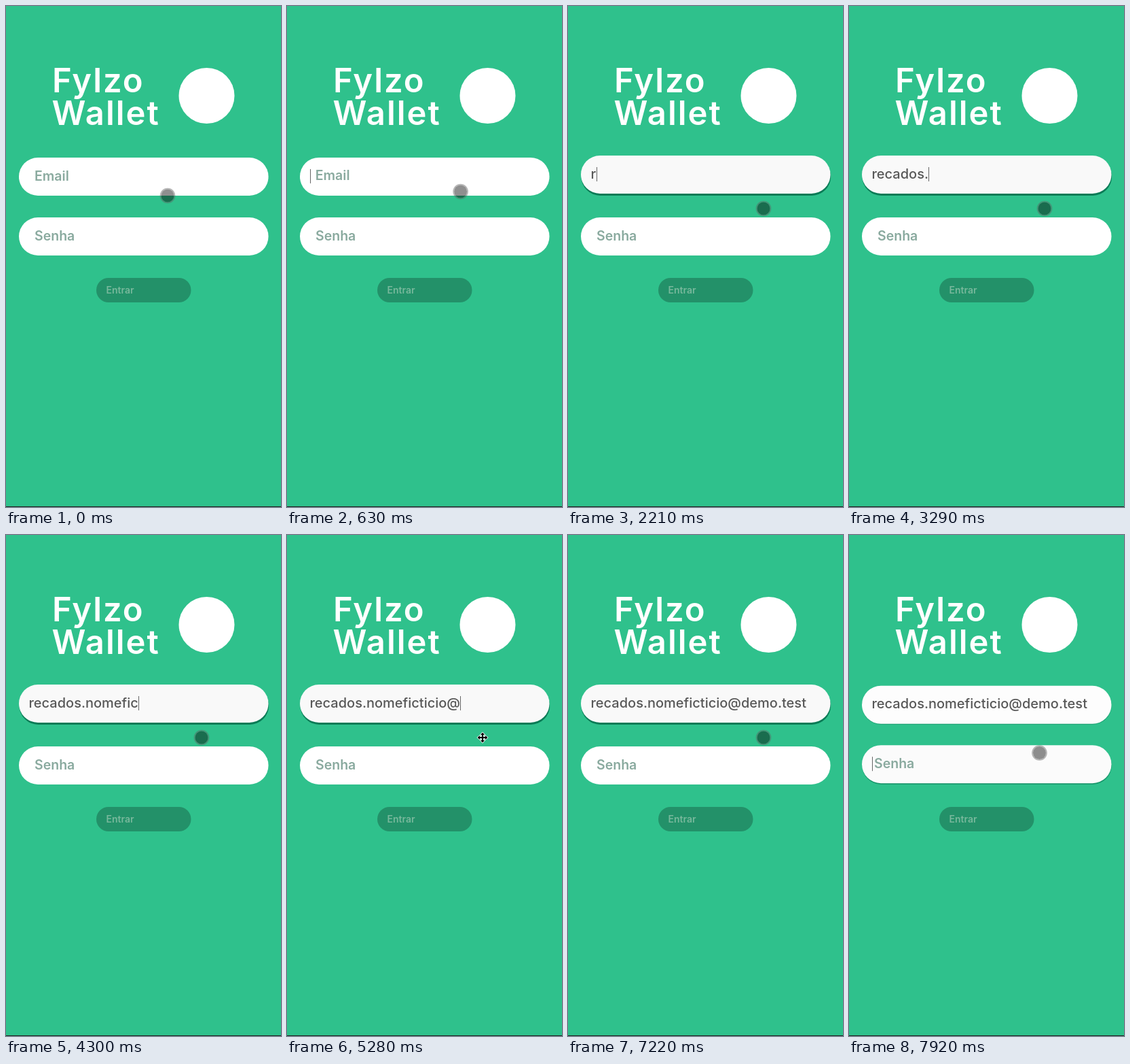
An HTML page for the animation above (8 s loop, 405 px wide and 737 px high).

```html
<!DOCTYPE html>
<html lang="pt">
<head>
<meta charset="utf-8">
<title>Login</title>
<style>
  html, body { margin: 0; height: 100%; overflow: hidden; background: #2fc18c; }
  svg { display: block; width: 100%; height: 100%; }
  text { font: 500 20px Inter, sans-serif; white-space: pre; }
  .title { font-size: 49px; font-weight: 600; letter-spacing: 2px; fill: #fff; }
  .hint { font-size: 19.5px; font-weight: 600; fill: #8aaa9f; }
  .value { fill: #585858; }
  .button { font-size: 14px; font-weight: 600; fill: #78b89c; }
  .shadow { fill: #0a7b56; }
  .caret { fill: #666; }
</style>
</head>
<body>
<svg viewBox="0 0 405 737">
  <defs>
    <rect id="pill" x="19" width="367.5" height="56" rx="28"/>
  </defs>
  <rect width="405" height="737" fill="#2fc18c"/>
  <rect y="736" width="405" height="1" fill="#222"/>
  <text class="title" x="68" y="127">Fylzo</text>
  <text class="title" x="67.5" y="175">Wallet</text>
  <circle cx="295.5" cy="132" r="41" fill="#fff"/>

  <g id="email">
    <use class="shadow" href="#pill"/>
    <use class="box" href="#pill"/>
    <text class="hint" y="33.5">Email</text>
    <text class="value" x="33.5" y="33.5"></text>
    <rect class="caret" y="17" width="1" height="21"/>
  </g>
  <g id="password">
    <use class="shadow" href="#pill"/>
    <use class="box" href="#pill"/>
    <text class="hint" y="33.5">Senha</text>
    <text class="value" x="33.5" y="33.5"></text>
    <rect class="caret" y="17" width="1" height="21"/>
  </g>

  <rect x="133" y="400" width="139.5" height="36" rx="18" fill="#239169"/>
  <text class="button" x="147.5" y="422.5">Entrar</text>

  <g id="pointer">
    <g id="touch">
      <circle r="9.5" fill-opacity=".44"/>
      <circle r="10.4" fill="none" stroke="#606060" stroke-width="1.8" stroke-opacity=".45"/>
    </g>
    <path id="move" stroke="#fff" stroke-width="1.6" paint-order="stroke" stroke-linejoin="round"
      d="M0-7.5 3-4H1V-1H4V-3L7.5 0 4 3V1H1V4H3L0 7.5-3 4H-1V1H-4V3L-7.5 0-4-3V-1H-1V-4H-3Z"/>
  </g>
</svg>
<script>
const LOOP = 8000;
const ADDRESS = 'recados.nomeficticio@demo.test';
const EMAIL_FOCUS = 600, TYPING = 2090, KEY_GAP = 157, PASSWORD_FOCUS = 7740;
const BLINK = 530;

// The pointer rests on the email field, crosses the next one and returns twice.
const stops = [
  { t: 0, x: 238, y: 279 },
  { t: 500, x: 252, y: 258 },
  { t: 910, x: 267, y: 320 },
  { t: 1040, x: 288, y: 304 },
  { t: 1310, x: 288, y: 298 },
  { t: 7600, x: 288, y: 298 },
  { t: 7920, x: 280.5, y: 320.5 }
];

const $ = id => document.getElementById(id);
const show = (node, on) => node.setAttribute('visibility', on ? 'visible' : 'hidden');
const clamp = (v, low, high) => Math.min(high, Math.max(low, v));

function ease(t, from, to) {
  const p = clamp((t - from) / (to - from), 0, 1);
  return p * p * (3 - 2 * p);
}

function pointerAt(t) {
  const next = stops.findIndex(stop => stop.t > t);
  if (next < 0) return stops.at(-1);
  const a = stops[next - 1], b = stops[next];
  const p = ease(t, a.t, b.t);
  return { x: a.x + (b.x - a.x) * p, y: a.y + (b.y - a.y) * p };
}

function caretOn(t, lastInput) {
  return t >= lastInput && Math.floor((t - lastInput) / BLINK) % 2 === 0;
}

function drawField(id, top, focus, value, caret) {
  const field = $(id);
  const part = name => field.querySelector('.' + name);
  const shade = 255 - Math.round(6 * focus);
  field.setAttribute('transform', `translate(0 ${top - 3 * focus})`);
  part('shadow').setAttribute('transform', `translate(${focus / 2} ${3 * focus})`);
  part('shadow').setAttribute('opacity', focus);
  part('box').setAttribute('fill', `rgb(${shade},${shade},${shade})`);
  part('hint').setAttribute('x', 42 - 8.3 * focus);
  show(part('hint'), !value);
  part('value').textContent = value;
  const end = value ? part('value').getComputedTextLength() : 0;
  part('caret').setAttribute('x', Math.round(34 + end));
  show(part('caret'), caret);
}

function draw(t) {
  const typed = clamp(Math.floor((t - TYPING) / KEY_GAP) + 1, 0, ADDRESS.length);
  const lastInput = typed ? TYPING + (typed - 1) * KEY_GAP : EMAIL_FOCUS;
  const password = ease(t, PASSWORD_FOCUS, PASSWORD_FOCUS + 320);
  const email = ease(t, EMAIL_FOCUS, EMAIL_FOCUS + 300) - password;
  const inPassword = t >= PASSWORD_FOCUS;
  drawField('email', 223, email, ADDRESS.slice(0, typed), !inPassword && caretOn(t, lastInput));
  drawField('password', 311, password, '', caretOn(t, PASSWORD_FOCUS));

  const { x, y } = pointerAt(t);
  const moving = t >= 4720 && t < 5850;
  $('pointer').setAttribute('transform', `translate(${x} ${y})`);
  show($('touch'), !moving);
  show($('move'), moving);
}

const start = performance.now();
function tick() {
  draw((performance.now() - start) % LOOP);
  requestAnimationFrame(tick);
}
tick();
</script>
</body>
</html>
```
